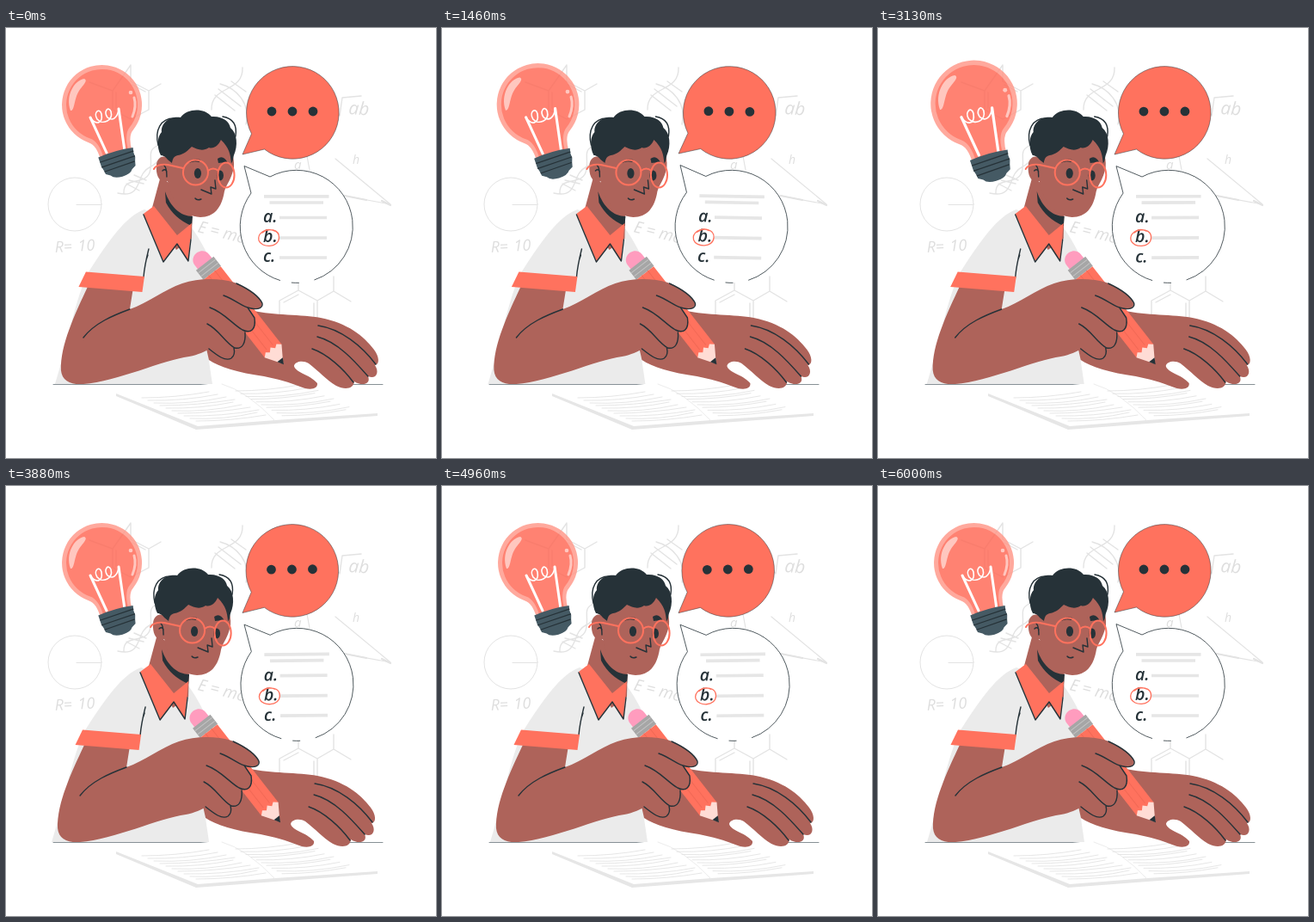
An HTML page for the animation above (6040 ms loop, 500 by 500 pixels).

```html
<!DOCTYPE html>
<html lang="en">
<head>
<meta charset="utf-8">
<title>Exam</title>
<style>
html, body { margin: 0; width: 100%; height: 100%; overflow: hidden; background: #fff; }
svg { display: block; width: 100vw; height: 100vh; }
text { font-family: "Open Sans", "Noto Sans", sans-serif; font-style: italic; }
.line { fill: none; stroke-linecap: round; stroke-linejoin: round; }
.ink { stroke: #263238; stroke-width: 1.4; }
.chalk { stroke: #e3e3e3; stroke-width: 1.4; }
.chalk-text { fill: #dedede; font-weight: 500; }
.skin { fill: #ae635a; }
.coral { fill: #ff725e; }
.dark { fill: #263238; }
.shirt { fill: #ebebeb; }
</style>
</head>
<body>
<svg viewBox="0 0 500 500">
  <!-- chalk formulas -->
  <g class="line chalk">
    <circle cx="80" cy="205" r="31" stroke-width="1"/>
    <path d="M82 205.500H110" stroke-width="1"/>
    <path d="M145 43V62L166 73V95L145 106L124 95V73ZM166 73L180 65M124 73L97 63M128 75V93M147 66L162 74"/>
    <path d="M130 192C160 199 150 170 167 162S178 142 193 142M137 192C136 170 165 186 168 164S160 145 187 130M140 181L155 189M143 177L160 181M149 171L163 177"/>
    <path d="M239 95C238 66 276 76 275 46M249 65C268 70 285 88 279 112M243 78L266 96M247 71L273 91M262 62L279 74"/>
    <path d="M385 98L388 102L391 81L413 79"/>
    <path d="M350 149L353 165M383 152L447 205L393 195" stroke-width="1.200"/>
    <path d="M394 195L419 200M437 201L447 206" stroke-width="2.200"/>
    <path d="M340 290V305L362 317V340L340 352L318 340V317L340 305M340 310L323 319M358 320V337M362 317L381 306V289M381 306L401 318"/>
  </g>
  <g class="chalk-text">
    <text transform="translate(57 261) rotate(-3)" font-size="18" word-spacing="2">R= 10</text>
    <text transform="translate(222 237) rotate(14)" font-size="19">E = mc²</text>
    <text x="398" y="100" font-size="21" transform="rotate(4 398 99)">ab</text>
    <text x="335" y="164" font-size="15">a</text>
    <text x="403" y="158" font-size="14">h</text>
  </g>

  <path class="line" d="M55 414.500H438" stroke="#37474f" stroke-width=".6"/>

  <!-- notebook -->
  <path d="M128 426L222 465L432 449L385 412L253 412Z" fill="#fff"/>
  <path d="M128 425L223 463L313 456L432 448V451L313 460L221 467L128 428Z" fill="#e6e6e6"/>
  <path class="line" d="M251 414Q280 422 313 457" stroke="#ececec"/>
  <g id="rules" class="line" stroke="#e0e0e0" stroke-width=".8"></g>

  <g id="bulb">
    <g opacity=".82" transform="translate(111.500 89.300) rotate(-16)">
      <path fill="#ff9788" d="M-27 38A46.500 46.500 0 1 1 27 38Q19 43 19 61H-19Q-19 43 -27 38Z"/>
      <path fill="#ff6754" d="M-24 34A41.500 41.500 0 1 1 24 34Q15 40 15 61H-15Q-15 40 -24 34Z"/>
    </g>
    <path class="line" stroke="#fff" stroke-width="3" d="M98 104L117 145M131 94L138 143"/>
    <path class="line" stroke="#fff" stroke-width="1.600" d="M98 104C104 113 113 112 111 100C109 92 101 98 106 106C112 113 125 108 122 97C119 90 113 97 118 104C124 109 130 104 131 94"/>
    <path fill="#ffc7bf" d="M75 96C69 79 79 61 91 59C96 61 89 67 85 73C79 82 80 97 75 96Z"/>
    <circle cx="145" cy="75" r="2.300" fill="#ffc7bf"/>
    <path class="line" d="M149 81Q152 91 147 103" stroke="#ffc7bf" stroke-width="3"/>
    <g transform="translate(111.500 89) rotate(-16)">
      <path fill="#455a64" d="M-21 58Q0 55 21 58L20 64L20.500 69L19 74L18 79L13 82Q10 87 0 87Q-10 87 -13 82L-18 79L-19 74L-20.500 69Z"/>
      <path class="line" d="M-20 64L20 62M-20 70L20 68M-18 76L18 74" stroke="#263238" stroke-width="1.200"/>
    </g>
  </g>

  <g id="talk">
    <path class="coral" stroke="#263238" stroke-width=".5" d="M285.500 123A53.800 53.800 0 1 1 300.500 141L275 147Z"/>
    <g class="dark"><circle cx="309" cy="97" r="5.400"/><circle cx="333" cy="97" r="5.400"/><circle cx="357" cy="97" r="5.400"/></g>
  </g>

  <g id="list">
    <path fill="#fff" stroke="#263238" stroke-width=".8" pathLength="100" stroke-dasharray="28 3 2 4 63 0" d="M285 192A65.500 65.500 0 1 0 307 173L277 160.500Z"/>
    <g class="line" stroke="#e6e6e6" stroke-width="3.700" style="stroke-linecap:butt">
      <path d="M300 195.800H375.500M306.500 203H369M318 220.500H373M318 244H373M318 267H373"/>
    </g>
    <g class="dark" font-size="19.500" font-weight="600">
      <text x="299" y="226">a.</text><text x="299" y="249">b.</text><text x="299" y="272.500">c.</text>
    </g>
    <path class="line" stroke="#ff725e" stroke-width="1.300" d="M312 236C301 231 292 240 294 247C297 256 317 256 317.500 244C318 234 305 232 298 238"/>
  </g>

  <g id="person">
    <path class="shirt" d="M161 211C139 219 119 248 96 284C80 315 71 371 57 414H240L234 373L250 300C238 268 227 247 215 231Z"/>
    <!-- neck and collar -->
    <path class="skin" d="M180 172L217 205L216 245L198 258L170 209Z"/>
    <path class="dark" d="M185 190C191 208 203 219 217 219L216 230Q196 222 186 203Z"/>
    <path class="coral" d="M172 207L199 241L216 227L212 270L199 252L183 271L160 216Z"/>
    <path class="line ink" d="M160 217L183 272L199 251L212 271L215 246"/>
    <path class="line ink" d="M166 257Q161 277 160 290M165 264L163 270"/>

    <!-- head -->
    <path class="skin" d="M188 145L250 126C261 139 266 148 265 162C262 177 257 180 254 190C251 209 242 220 226 220C205 219 192 201 188 178C179 181 174 172 175 160C175 151 183 146 190 152Z"/>
    <path class="dark" d="M188 153C184 148 181 148 180 148C175 138 176 126 181 121C180 110 191 102 203 104C211 93 231 93 239 103C252 102 260 109 261 116C269 122 270 137 265 148C264 152 264 156 262 157C261 147 260 140 250 130C247 137 241 141 236 139C229 144 222 141 216 138C212 142 207 147 200 148C195 149 194 152 193 157Z"/>
    <path class="line ink" d="M177 136C173 120 179 104 197 105M252 103C264 105 269 113 267 126" stroke-width="1"/>
    <path class="line ink" d="M180 159Q187 157 187 173M182 166Q185 163 187 167" stroke-width="1"/>
    <g class="dark">
      <ellipse cx="223" cy="169" rx="4.100" ry="6"/><ellipse cx="249" cy="171.500" rx="4" ry="6"/>
      <path d="M213 157Q217 151 226 153L225 156Q218 154 213 157ZM246 152Q253 147 258 157Q251 156 247 157Z"/>
    </g>
    <path class="line ink" d="M243 177L244 187L238 185L239 193L227 188" stroke-width="1.800"/>
    <path class="line ink" d="M220 198Q222 201 227 199"/>
    <g class="line" stroke="#ff725e" stroke-width="2">
      <circle cx="220.500" cy="168" r="14.500"/><ellipse cx="256" cy="171" rx="9.600" ry="14.500"/>
      <path d="M235 166Q241 161 247 166M206 163L188 159Q175 158 172 164"/>
    </g>

    <!-- resting hand -->
    <path class="skin" d="M262 329L288 329C310 334 345 333 366 337C397 343 416 358 428 374C434 382 435 391 429 392C435 401 430 409 421 405C425 414 414 417 405 411C404 420 394 421 384 416C372 409 364 399 352 390C345 386 336 388 335 393C337 401 352 402 362 413C363 421 351 421 342 417C330 412 315 408 300 405C270 401 248 394 236 386L232 368Z"/>
    <path class="line ink" d="M363 346C390 350 414 370 430 391M362 359C386 365 406 388 421 405M356 373C374 379 393 397 404 412"/>

    <!-- pencil -->
    <g transform="translate(222 262) rotate(52)">
      <path fill="#ff9cbe" d="M17 -10.500H10C-4 -10.500 -4 10.500 10 10.500H17Z"/>
      <path fill="#a6a6a6" d="M15 -13H29V13H15Z"/>
      <path class="line" d="M19 -12V12M24 -12V12" stroke="#c4c4c4"/>
      <path class="coral" d="M29 -12.500H144V12.500H29Z"/>
      <path class="line" d="M29 -4H138M29 5H138" stroke="#f26956"/>
      <path fill="#ffdcd5" d="M144 -12.500L163 0L144 12.500L140 8L143 4L139 0L143 -4L140 -8Z"/>
      <path class="dark" d="M157 -4L164 0L157 4Z"/>
    </g>

    <!-- writing arm -->
    <path class="skin" d="M95 301C80 333 63 369 64 398C65 410 75 415 90 414C130 411 182 386 213 382C224 380 231 376 237 373C245 382 255 388 262 384C267 380 265 375 265 372C275 374 279 366 278 353C288 355 291 347 289 336C285 331 283 328 281 325C290 329 298 327 298 320C294 311 281 302 266 296C250 291 225 290 205 297C184 304 165 320 144 327L148 302Z"/>
    <path class="line ink" d="M90 360C103 343 125 334 144 327M253 311C269 317 275 325 285 326C294 328 299 325 298 320C293 310 281 303 268 297M237 325C254 331 264 345 275 351C285 356 291 350 289 337L281 325M234 344C248 351 254 365 266 372C275 374 279 366 278 354M236 373C246 381 255 388 262 384Q267 380 265 372"/>
    <path class="coral" d="M93 283.500L161 289L158.500 307L84.500 301Z"/>
  </g>
</svg>
<script>
const LOOP = 6040;
const $ = id => document.getElementById(id);

// Linear interpolation through [phase, value] keys.
function track(keys, p) {
  const i = Math.max(1, keys.findIndex(k => k[0] >= p));
  const [a, u] = keys[i - 1], [b, v] = keys[i];
  return u + (v - u) * (p - a) / (b - a);
}

const beat = [[0, 1], [.1, 1.1], [.3, 1], [.4, 1], [.5, 1.1], [.6, 1], [1, 1]];
const sway = [[0, 0], [.25, 1], [.75, -1], [1, 0]];

// Side step that fills 80% of each half loop and then rests.
function lean(p) {
  const u = ((p * 2 + .03) % 1) / .8;
  return u < 1 ? -2.2 * (1 - Math.cos(2 * Math.PI * u)) : 0;
}

let rules = "";
for (let i = 0; i < 10; i++) {
  const rule = (x, y, w) => `M${x} ${y}q${w * .5} ${i % 3} ${w} -7`;
  rules += rule(158 + i * 7, 430 + i * 3, 78 + i % 4 * 3);
  rules += rule(267 + i * 6, 422 + i * 3.2, 74 + i % 3 * 5);
}
$("rules").innerHTML = `<path d="${rules}"/>`;

function draw(now) {
  const p = now % LOOP / LOOP;
  const turn = track(sway, p);
  $("bulb").setAttribute("transform",
    `translate(111.5 108.5) scale(${track(beat, p)}) translate(-111.5 -108.5)`);
  $("talk").setAttribute("transform", `rotate(${turn} 331 151)`);
  $("list").setAttribute("transform", `rotate(${turn} 338 160)`);
  $("person").setAttribute("transform", `translate(${lean(p)} 0)`);
}

const start = performance.now();
function frame() {
  draw(performance.now() - start);
  requestAnimationFrame(frame);
}
frame();
</script>
</body>
</html>
```
